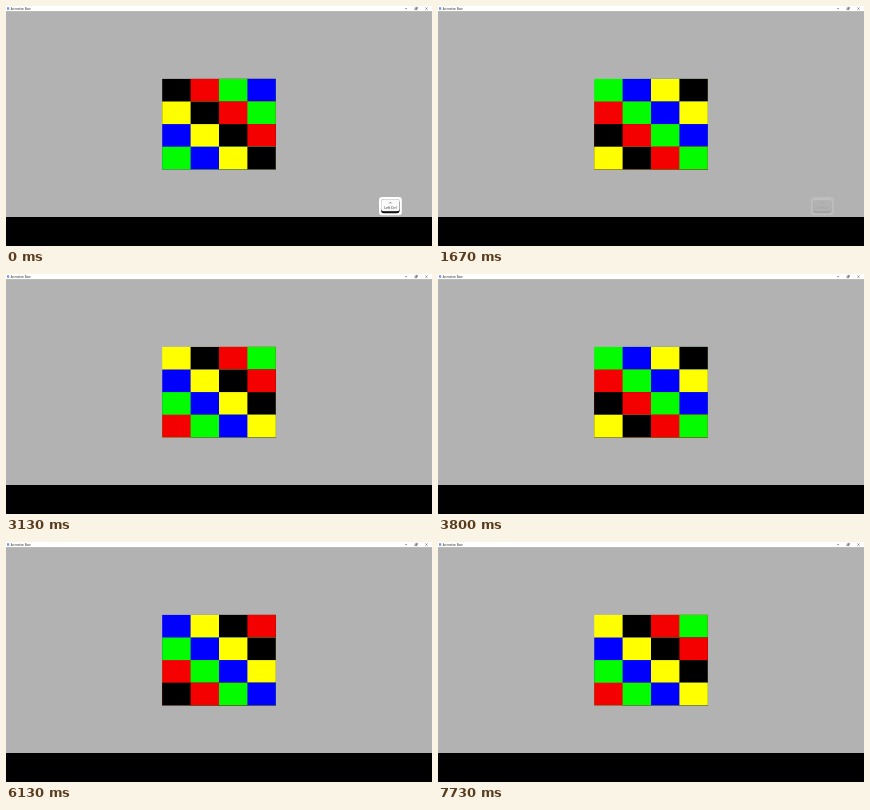
Animation, 426 px wide and 240 px high, one loop 7790 ms. Source, as an HTML page with a canvas:

```html
<!DOCTYPE html>
<html lang="en">
<head>
<meta charset="utf-8">
<title>Colour grid</title>
<style>
html, body { margin: 0; width: 100%; height: 100%; overflow: hidden; background: #000; }
canvas { display: block; width: 426px; height: 240px; }
</style>
</head>
<body>
<canvas id="stage" width="426" height="240"></canvas>
<script>
const ctx = document.getElementById('stage').getContext('2d');
const LOOP = 7790;
const STEP = 500;
const LEAD = 320;
const COLORS = ['#000', '#f40000', '#04fc00', '#00f', '#ff0'];
const CELL_W = 28.4;
const CELL_H = 22.6;
const CENTER_X = 213;
const CENTER_Y = 118.1;

function rect(x, y, w, h, color) {
  ctx.fillStyle = color;
  ctx.fillRect(x, y, w, h);
}

function rounded(x, y, w, h, r, color) {
  ctx.beginPath();
  ctx.roundRect(x, y, w, h, r);
  ctx.fillStyle = color;
  ctx.fill();
}

function line(...points) {
  ctx.beginPath();
  points.forEach(([x, y]) => ctx.lineTo(x, y));
  ctx.stroke();
}

function text(str, x, y, size, align) {
  ctx.font = size + 'px "Open Sans", sans-serif';
  ctx.textAlign = align;
  ctx.fillStyle = '#222';
  ctx.fillText(str, x, y);
}

function drawWindow() {
  rect(0, 0, 426, 240, '#000');
  rect(0, 0, 426, 211, '#b2b2b2');
  rect(0, 0, 426, 5.1, '#fff');
  rect(1, 1.2, 2.2, 2.6, '#7f98d4');
  text('Animation Base', 4.8, 3.7, 2.75, 'left');
  ctx.strokeStyle = '#444';
  ctx.lineWidth = 0.5;
  line([399, 2.6], [401.2, 2.6]);
  ctx.strokeRect(409, 2, 1.8, 1.8);
  line([409.8, 1.3], [411.5, 1.3], [411.5, 3]);
  line([419.4, 1.5], [421.6, 3.7]);
  line([421.6, 1.5], [419.4, 3.7]);
}

// Each cell reaches the far corner; later cells cover the rest without seams.
function drawGrid(shift) {
  const left = CENTER_X - 2 * CELL_W;
  const top = CENTER_Y - 2 * CELL_H;
  for (let row = 0; row < 4; row++) {
    for (let col = 0; col < 4; col++) {
      const i = (col - row - shift + 50) % 5;
      rect(left + col * CELL_W, top + row * CELL_H,
        (4 - col) * CELL_W, (4 - row) * CELL_H, COLORS[i]);
    }
  }
}

function drawKey(alpha) {
  if (alpha <= 0) return;
  ctx.globalAlpha = alpha;
  rounded(373, 191, 22.8, 18.2, 3, '#fff');
  rounded(375, 194, 18.6, 13.2, 2.4, '#111');
  rounded(375, 193, 18.6, 12.3, 2.4, '#b8b8b8');
  rounded(375.4, 193.4, 17.8, 11.7, 2.2, '#fafafa');
  ctx.strokeStyle = '#333';
  ctx.lineWidth = 0.6;
  line([383.2, 197.4], [384.4, 196.2], [385.6, 197.4]);
  text('Left Ctrl', 384.4, 203.3, 3.4, 'center');
  ctx.globalAlpha = 1;
}

function draw(now) {
  const t = now % LOOP;
  drawWindow();
  drawGrid(Math.floor((t + LEAD) / STEP));
  drawKey(Math.min(1, (1700 - t) / 200));
  requestAnimationFrame(draw);
}

draw(0);
</script>
</body>
</html>
```
